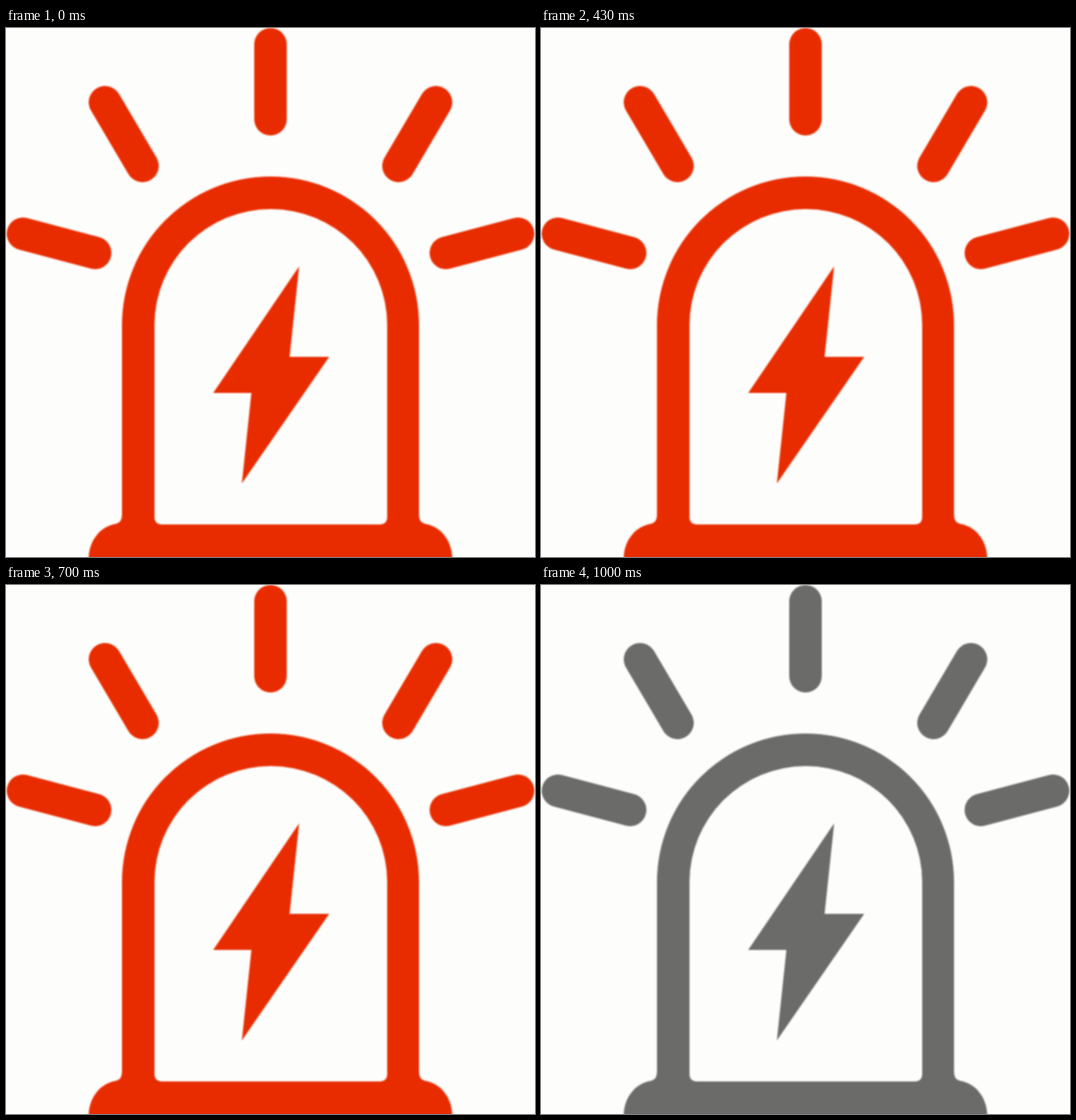
Write an HTML page without scripts that moves like this. It is 748 by 748 pixels and loops after 1030 ms.

```html
<!DOCTYPE html>
<html lang="en">
<head>
<meta charset="utf-8">
<title>Siren</title>
<style>
  html, body { margin: 0; width: 100%; height: 100%; overflow: hidden; background: #fdfdfb; }
  svg { display: block; width: 100%; height: 100%; }
  .siren {
    --on: #e82c00;
    --off: #6b6b69;
    color: var(--on);
    fill: currentColor;
    filter: blur(1.3px); /* soft edges */
    animation: flash 1030ms step-end infinite;
  }
  .rays { fill: none; stroke: currentColor; stroke-width: 46; stroke-linecap: round; }
  /* switches at 200, 370, 530, 700 and 870 ms */
  @keyframes flash {
    0%, 35.922%, 67.961% { color: var(--on); }
    19.417%, 51.456%, 84.466% { color: var(--off); }
    100% { color: var(--on); }
  }
</style>
</head>
<body>
<svg viewBox="0 0 748 748">
  <g class="siren">
    <path class="rays" d="M374 23V129 M140 105L193 195 M608 105L555 195 M24 291L126 318 M724 291L622 318"/>
    <path fill-rule="evenodd" d="M117 760V748C118 724 134 704 156 701Q164 699 164 688V420A210 210 0 0 1 584 420V688Q584 699 592 701C614 704 630 724 631 748V760Z
      M210 420A164.5 164 0 0 1 539 420V691Q539 702 528 702H221Q210 702 210 691Z"/>
    <path d="M414.5 337L401 465H457L333.5 644L347 516H293Z"/>
  </g>
</svg>
</body>
</html>
```
